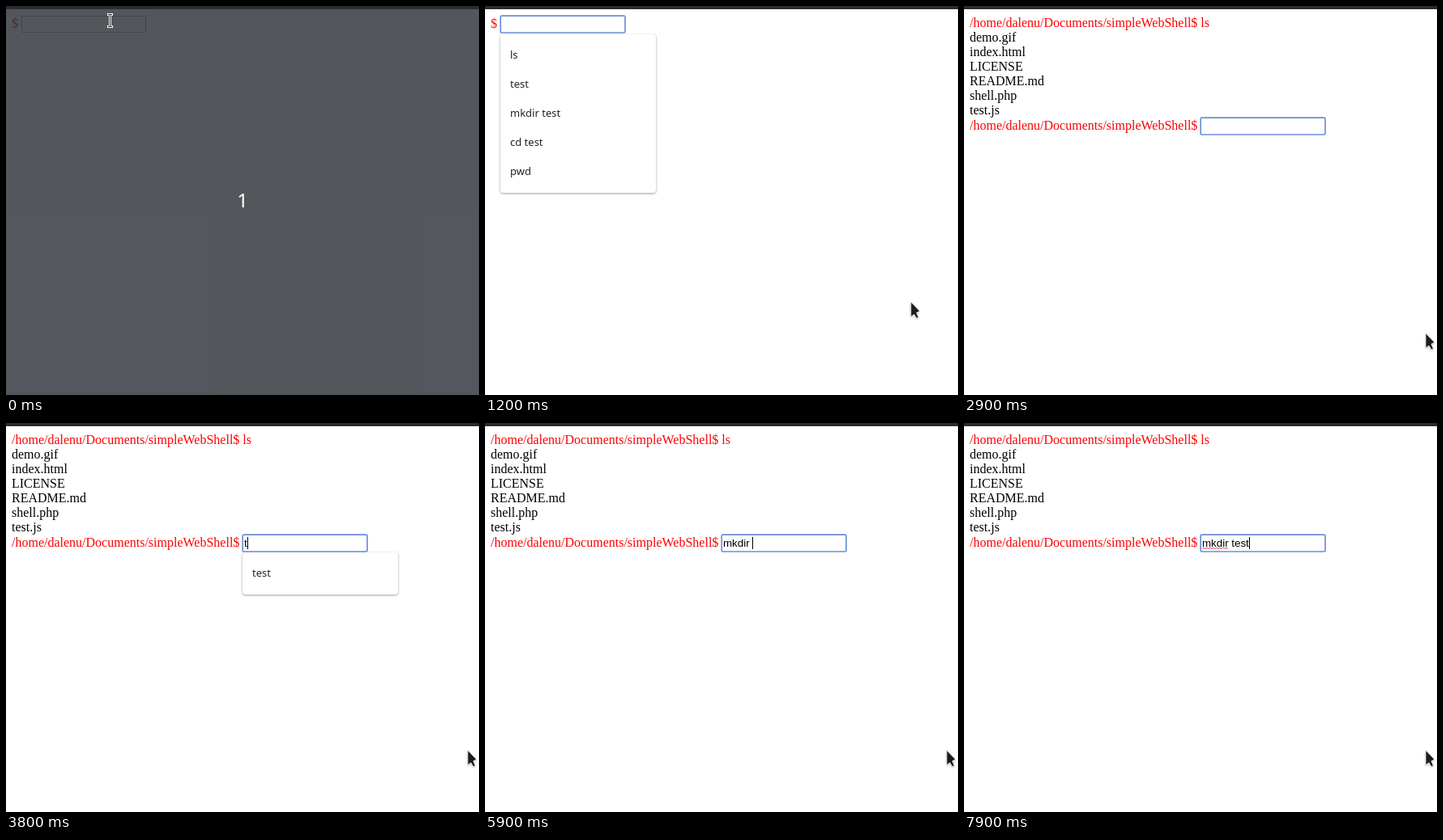
An HTML page that plays this animation: 584x481 px, repeating every 8000 ms.

```html
<!DOCTYPE html>
<html lang="en">
<head>
<meta charset="utf-8">
<title>Web shell demo</title>
<style>
  html, body { margin: 0; width: 100%; height: 100%; overflow: hidden; background: #fff; }
  svg { display: block; }
  text { white-space: pre; }
  .page { font: 16px "Liberation Serif", serif; }
  .prompt { fill: #f00; }
  .typed { font: 13.333px "Liberation Sans", sans-serif; }
  .menu { font: 13px "Noto Sans", sans-serif; fill: #222; }
  .panel { fill: #fff; filter: drop-shadow(0 1px 1.5px rgba(0, 0, 0, .38)); }
  .count { font: 24px "Noto Sans", sans-serif; fill: #fff; text-anchor: middle; }
  .pointer { filter: drop-shadow(0 1px 1px rgba(0, 0, 0, .25)); }
</style>
</head>
<body>
<svg width="584" height="481" viewBox="0 0 584 481">
  <rect width="584" height="481" fill="#fff"/>
  <rect width="584" height="4" fill="#2c2a2f"/>

  <text id="start" class="page prompt" x="7" y="27">$</text>
  <g id="listing" class="page"></g>

  <g id="field">
    <rect id="border" fill="#fff"/>
    <text id="typed" class="typed" x="2" y="15"></text>
    <path id="squiggle" fill="none" stroke="#e5484d" stroke-width="1"/>
    <rect id="caret" y="3" width="1" height="15" fill="#000"/>
  </g>
  <g id="menu" class="menu"></g>

  <g id="overlay">
    <rect width="584" height="481" fill="#292d34" fill-opacity=".8"/>
    <text class="count" x="292" y="249">1</text>
  </g>

  <g id="beam" fill="none" stroke-linecap="square">
    <path id="beamShape" d="M126.5 10.5h1.5l.5 .5l.5-.5h1.5M128.5 11v14M126.5 25.5h1.5l.5-.5l.5 .5h1.5" stroke="#fff" stroke-width="3"/>
    <use href="#beamShape" id="beamCore"/>
    <path d="M126.5 10.5h1.5l.5 .5l.5-.5h1.5M128.5 11v14M126.5 25.5h1.5l.5-.5l.5 .5h1.5" stroke="#222" stroke-width="1"/>
  </g>
  <path id="arrow" class="pointer" d="M0 0V18.5L4 15.5L7 20.5L9.5 19.2L7 13.5L11 11.5Z"
        fill="#1d1d20" stroke="#fff" stroke-width=".8" stroke-linejoin="round"/>
</svg>
<script>
const LOOP = 8000;
const $ = id => document.getElementById(id);
const show = (id, on) => $(id).setAttribute('visibility', on ? 'visible' : 'hidden');

function add(parent, tag, attrs, text = '') {
  const node = document.createElementNS('http://www.w3.org/2000/svg', tag);
  for (const key in attrs) node.setAttribute(key, attrs[key]);
  node.textContent = text;
  return parent.appendChild(node);
}

$('beamCore').remove();

const path = '/home/dalenu/Documents/simpleWebShell$ ';
const files = ['demo.gif', 'index.html', 'LICENSE', 'README.md', 'shell.php', 'test.js'];
add($('listing'), 'text', { x: 7, y: 26, class: 'prompt' }, path + 'ls');
files.forEach((name, i) => add($('listing'), 'text', { x: 7, y: 44 + 18 * i }, name));
add($('listing'), 'text', { x: 7, y: 153, class: 'prompt' }, path);

let wave = 'M2 17.5';
for (let x = 4; x <= 34; x += 2) wave += `L${x} ${x % 4 ? 17.5 : 16.3}`;
$('squiggle').setAttribute('d', wave);

const history = ['ls', 'test', 'mkdir test', 'cd test', 'pwd'];
const pen = document.createElement('canvas').getContext('2d');
pen.font = '13.333px "Liberation Sans", sans-serif';

// Each step changes only the listed parts of the state.
const steps = [
  [0, { overlay: true, listed: false, focus: false, text: '', caret: false, squiggle: false,
        items: [], fade: 1, scale: 1, lift: 0, travel: 0 }],
  [400, { overlay: false }],
  [600, { focus: true, caret: true, items: history }],
  [900, { travel: .1 }],
  [1000, { travel: .35 }],
  [1100, { travel: .65 }],
  [1200, { travel: .9, caret: false }],
  [1300, { travel: 1 }],
  [1800, { caret: true }],
  [2000, { text: 'l', items: ['ls'] }],
  [2100, { text: 'ls', fade: .4, scale: .98, lift: .5 }],
  [2200, { text: '', listed: true, items: [], fade: 1, scale: 1, lift: 0 }],
  [2900, { caret: false }],
  [3400, { caret: true }],
  [3800, { text: 't', items: ['test'], lift: 1 }],
  [3900, { lift: 0 }],
  [4000, { text: 'te' }],
  [4300, { text: 'tes' }],
  [4500, { text: 't' }],
  [4600, { text: '', caret: false }],
  [4700, { caret: true, fade: .4, scale: .98 }],
  [4800, { fade: .12, scale: .96 }],
  [4900, { items: [], fade: 1, scale: 1 }],
  [5100, { text: 'm' }],
  [5400, { text: 'mk' }],
  [5700, { text: 'mkdi' }],
  [5900, { text: 'mkdir ' }],
  [6400, { squiggle: true }],
  [6900, { caret: false }],
  [7100, { caret: true }],
  [7400, { text: 'mkdir t' }],
  [7600, { text: 'mkdir tes' }],
  [7900, { text: 'mkdir test' }]
];

function drawField(s, x, y) {
  $('field').setAttribute('transform', `translate(${x} ${y})`);
  const edge = s.focus
    ? { x: .2, y: .2, width: 153.8, height: 20.8, rx: 1.5, stroke: '#6c8fd9', 'stroke-width': 1.7 }
    : { x: .5, y: .5, width: 153, height: 20, rx: 0, stroke: '#a5a5b2', 'stroke-width': 1 };
  for (const key in edge) $('border').setAttribute(key, edge[key]);
  $('typed').textContent = s.text;
  $('caret').setAttribute('x', Math.round(2 + pen.measureText(s.text).width));
  show('caret', s.caret);
  show('squiggle', s.squiggle);
}

function drawMenu(s, x, y) {
  const menu = $('menu');
  menu.replaceChildren();
  if (!s.items.length) return;
  const height = 16 + 36 * s.items.length;
  menu.setAttribute('opacity', s.fade);
  menu.setAttribute('transform',
    `translate(${x + 96} ${y + height / 2 - s.lift}) scale(${s.scale}) translate(-96 ${-height / 2})`);
  add(menu, 'rect', { class: 'panel', width: 192, height, rx: 4 });
  s.items.forEach((item, i) => add(menu, 'text', { x: 12, y: 30 + 36 * i }, item));
}

let last = -1;
function frame(now) {
  const t = now % LOOP;
  const current = steps.filter(step => step[0] <= t).length;
  if (current !== last) {
    last = current;
    const s = Object.assign({}, ...steps.slice(0, current).map(step => step[1]));
    const [x, y] = s.listed ? [292, 138] : [19, 12];
    show('overlay', s.overlay);
    show('start', !s.listed);
    show('listing', s.listed);
    drawField(s, x, y);
    drawMenu(s, x, y + 23);
    show('beam', !s.travel);
    show('arrow', s.travel);
    $('arrow').setAttribute('transform',
      `translate(${128 + 442 * s.travel} ${18 + 386.5 * s.travel})`);
  }
  requestAnimationFrame(frame);
}
const origin = performance.now();
const tick = () => frame(Math.max(0, performance.now() - origin));
frame(0);
</script>
</body>
</html>
```
